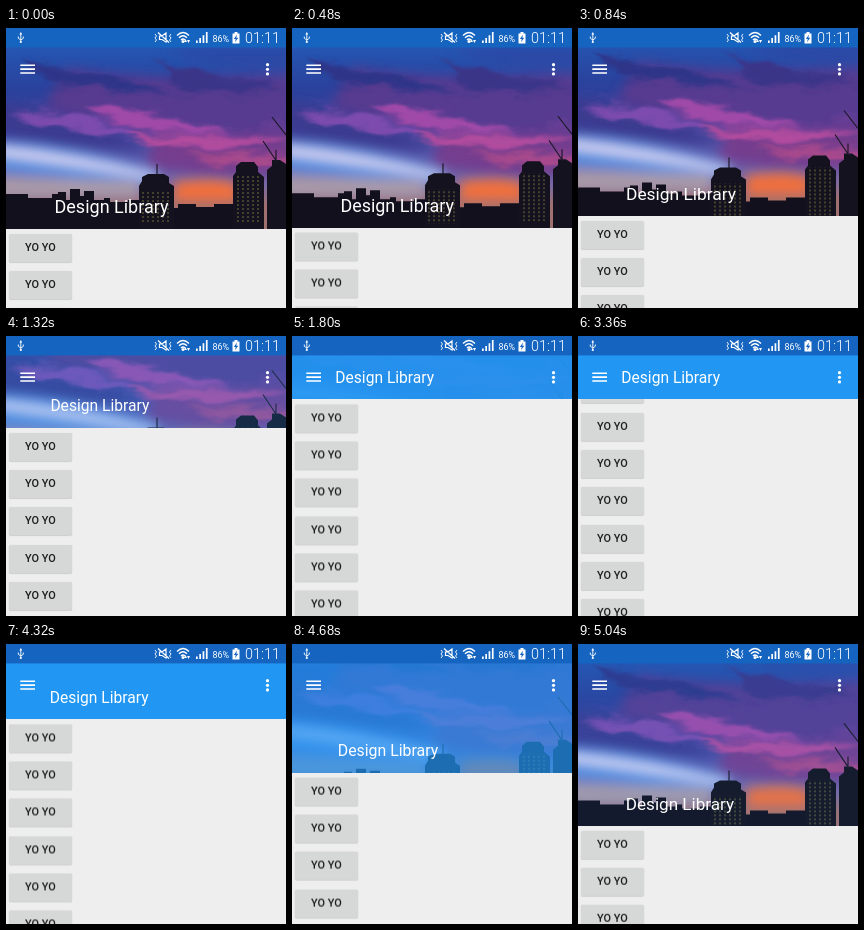
An HTML page that plays this animation: 280x280 px, repeating every 5160 ms.

```html
<!DOCTYPE html>
<html lang="en">
<head>
<meta charset="utf-8">
<title>Collapsing toolbar</title>
<style>
html, body { margin: 0; width: 100%; height: 100%; overflow: hidden; background: #eee; }
#stage { position: relative; width: 280px; height: 280px; overflow: hidden; font-family: Roboto, "Noto Sans", sans-serif; }
#stage > *, #head > * { position: absolute; left: 0; top: 0; }
#list { width: 280px; will-change: transform; }
#list div {
  position: absolute; left: 3.2px; width: 62.4px; height: 28px; border-radius: 1.6px;
  background: #d6d7d7; box-shadow: 0 .6px 1px rgba(0,0,0,.25);
  font: 500 10.9px/28.6px Roboto, "Noto Sans", sans-serif; color: #1c1c1c; text-align: center;
}
#head { width: 280px; overflow: hidden; background: #2196f3; }
#scrim { width: 280px; height: 202px; background: #2196f3; }
#title { color: #fff; line-height: 24px; white-space: pre; }
</style>
</head>
<body>
<div id="stage">
  <div id="list"></div>
  <div id="head">
    <svg id="photo" width="280" height="202" viewBox="0 0 280 202">
      <defs>
        <linearGradient id="sky" x2="0" y2="1">
          <stop offset=".08" stop-color="#2458b4"/>
          <stop offset=".3" stop-color="#2a429c"/>
          <stop offset=".5" stop-color="#3c409a"/>
          <stop offset=".66" stop-color="#5c5cae"/>
          <stop offset=".78" stop-color="#7a6aa4"/>
          <stop offset=".88" stop-color="#a0706f"/>
        </linearGradient>
        <filter id="soft" x="-20%" y="-40%" width="140%" height="180%"><feGaussianBlur stdDeviation="6"/></filter>
        <filter id="mist" x="-20%" y="-40%" width="140%" height="180%">
          <feGaussianBlur stdDeviation="2.5" result="b"/>
          <feTurbulence type="fractalNoise" baseFrequency=".025 .06" numOctaves="3" seed="4"/>
          <feDisplacementMap in="b" scale="22" xChannelSelector="R" yChannelSelector="G"/>
        </filter>
        <pattern id="lit" width="5" height="4" patternUnits="userSpaceOnUse">
          <path d="M1 1h2" stroke="#8a8440" stroke-width=".8"/>
        </pattern>
      </defs>
      <rect width="280" height="202" fill="url(#sky)"/>
      <g filter="url(#soft)">
        <path d="M60 40Q150 56 290 46V112Q190 116 110 98T40 76Z" fill="#563a90"/>
        <path d="M-10 76Q50 78 100 102T150 122Q80 122 -10 104Z" fill="#3a3a90"/>
        <path d="M-10 114Q60 116 150 144V158Q60 150 -10 144Z" fill="#5c8cdc"/>
        <path d="M150 104Q220 116 290 104V146Q210 152 140 138Z" fill="#743c8e"/>
        <path d="M-10 148Q60 152 134 152V170H-10Z" fill="#a99aa8"/>
        <path d="M160 20H290V44Q220 50 160 20Z" fill="#2a48a6"/>
      </g>
      <g filter="url(#mist)">
        <path d="M20 36Q70 34 120 52T190 66Q110 68 60 56T20 36Z" fill="#2d3488"/>
        <path d="M150 34Q210 44 282 62Q210 70 174 56Z" fill="#3a3488"/>
        <path d="M4 86Q50 78 104 96T168 112Q90 110 50 100T4 86Z" fill="#7d4cae"/>
        <path d="M82 78Q150 82 196 96T284 98Q220 110 160 104T82 78Z" fill="#a04aa8"/>
        <path d="M120 104Q190 112 284 106Q230 126 180 122T120 104Z" fill="#b04c9e"/>
        <path d="M176 130Q230 124 284 128V138Q220 140 176 130Z" fill="#a84a8c"/>
      </g>
      <g filter="url(#soft)">
        <path d="M-10 118Q70 126 150 146V152Q70 138 -10 128Z" fill="#e8dcf4"/>
        <path d="M168 154Q210 148 232 156V174H168Z" fill="#f0703c"/>
      </g>
      <path d="M0 166H22V170H46V166H52V164H60V172H64V161H74V168H78V163H88V172H98V170H104V174H122V172H134V180H172V176H190V179H208V176H228V202H0Z" fill="#12101d"/>
      <g fill="#14121e">
        <path d="M133 202V158L136 153V149L142 146H158L163 149V155L168 158V202Z"/>
        <path d="M227 202V148L230 144V138L235 134H248L252 139V144L258 149V202Z"/>
        <path d="M261 202V142L266 138V132H274L280 136V202Z"/>
      </g>
      <path d="M136 162H164V196H136ZM230 146H255V194H230Z" fill="url(#lit)"/>
      <path d="M151 147V136M257 113L271 134M266 89L280 107M270 133V122" fill="none" stroke="#1b1828" stroke-width="1.2"/>
    </svg>
    <div id="scrim"></div>
  </div>
  <div id="title">Design Library</div>
  <svg width="280" height="64" viewBox="0 0 280 64" fill="none" stroke="#fff">
    <rect width="280" height="19.4" fill="#1565c0" stroke="none"/>
    <g stroke-width=".9">
      <path d="M14.800 6V14M12.300 8.500V10.300L14.800 12L17.300 10.300V8.500"/>
      <path d="M149 6L150.500 8L149 10L150.500 12L149 14M165 6L163.500 8L165 10L163.500 12L165 14"/>
      <path d="M152 4.500L163 14.500M153.500 8H156L160 5V14L156 11.500H153.500Z" stroke-width="1.200"/>
      <path d="M171 7.500Q177 1.500 183 7.500M173 9.800Q177 5.800 181 9.800M175 12Q177 10 179 12" stroke-width="1.300"/>
    </g>
    <g fill="#fff" stroke="none">
      <path d="M14.800 4L16.200 6.500H13.400Z"/>
      <circle cx="14.800" cy="14" r="1.100"/>
      <circle cx="177" cy="13.500" r="1.500"/>
      <path d="M179.500 11L181 14H178ZM182.500 15L184 12H181Z"/>
      <path d="M190 12.500h1.700v2.500h-1.700zM193.300 10h1.700v5h-1.700zM196.600 7.300h1.700v7.700h-1.700zM199.900 4h1.700v11h-1.700z"/>
      <path d="M228.500 4H231.500V5.500H233.500V15.500H226.500V5.500H228.500Z"/>
      <path d="M231 6.500L227.800 11H229.800L229 14.300L232.300 9.800H230.300Z" fill="#1565c0"/>
      <text x="206.500" y="13.600" font-size="9">86%</text>
      <text x="239" y="15.300" font-size="14.400" font-weight="300">01:11</text>
      <circle cx="261.500" cy="36.700" r="1.600"/>
      <circle cx="261.500" cy="41.300" r="1.600"/>
      <circle cx="261.500" cy="45.900" r="1.600"/>
    </g>
    <path d="M14.300 37.200H29M14.300 41.100H29M14.300 45H29" stroke-width="1.600"/>
  </svg>
</div>
<script>
const LOOP = 5160, STEP = 120, PITCH = 37.33;
const OPEN = 201, SHUT = 63.4;
const $ = id => document.getElementById(id);
const list = $('list'), head = $('head'), photo = $('photo'), scrim = $('scrim'), title = $('title');

// [time, value] pairs
const heights = [[0, OPEN], [360, OPEN], [600, 198], [840, 188], [960, 173], [1320, 92],
  [1560, 65], [1680, SHUT], [4240, SHUT], [4320, 75.400], [5040, 181.800], [LOOP, OPEN]];
const scrolls = [[0, 0], [1800, 0], [1920, 8], [2520, 110], [2760, 124.9], [3000, 126],
  [3360, 103.5], [4240, 0], [LOOP, 0]];
const fades = [[0, 0], [1200, 0], [1800, .93], [1920, 1], [4500, 1], [5040, .07], [LOOP, 0]];

function at(keys, t) {
  const i = keys.findIndex(k => k[0] > t);
  const [t0, a] = keys[i - 1], [t1, b] = keys[i];
  return a + (b - a) * (t - t0) / (t1 - t0);
}

for (let i = 0; i < 12; i++) {
  const b = document.createElement('div');
  b.textContent = 'YO YO';
  b.style.top = 4.7 + i * PITCH + 'px';
  list.append(b);
}

function draw(now) {
  const t = Math.floor(now % LOOP / STEP) * STEP;
  const h = at(heights, t), e = (h - SHUT) / (OPEN - SHUT);
  head.style.height = h + 'px';
  photo.style.transform = `translateY(${(h - OPEN) / 2}px)`;
  scrim.style.opacity = at(fades, t);
  list.style.transform = `translateY(${h - at(scrolls, t)}px)`;
  title.style.fontSize = 15.6 + 2.4 * e ** 3 + 'px';
  title.style.transform = `translate(${43.3 + 5.2 * e}px, ${h - 33.9}px)`;
}

let start;
function tick(now) {
  start ??= now;
  draw(now - start);
  requestAnimationFrame(tick);
}
draw(0);
requestAnimationFrame(tick);
</script>
</body>
</html>
```
